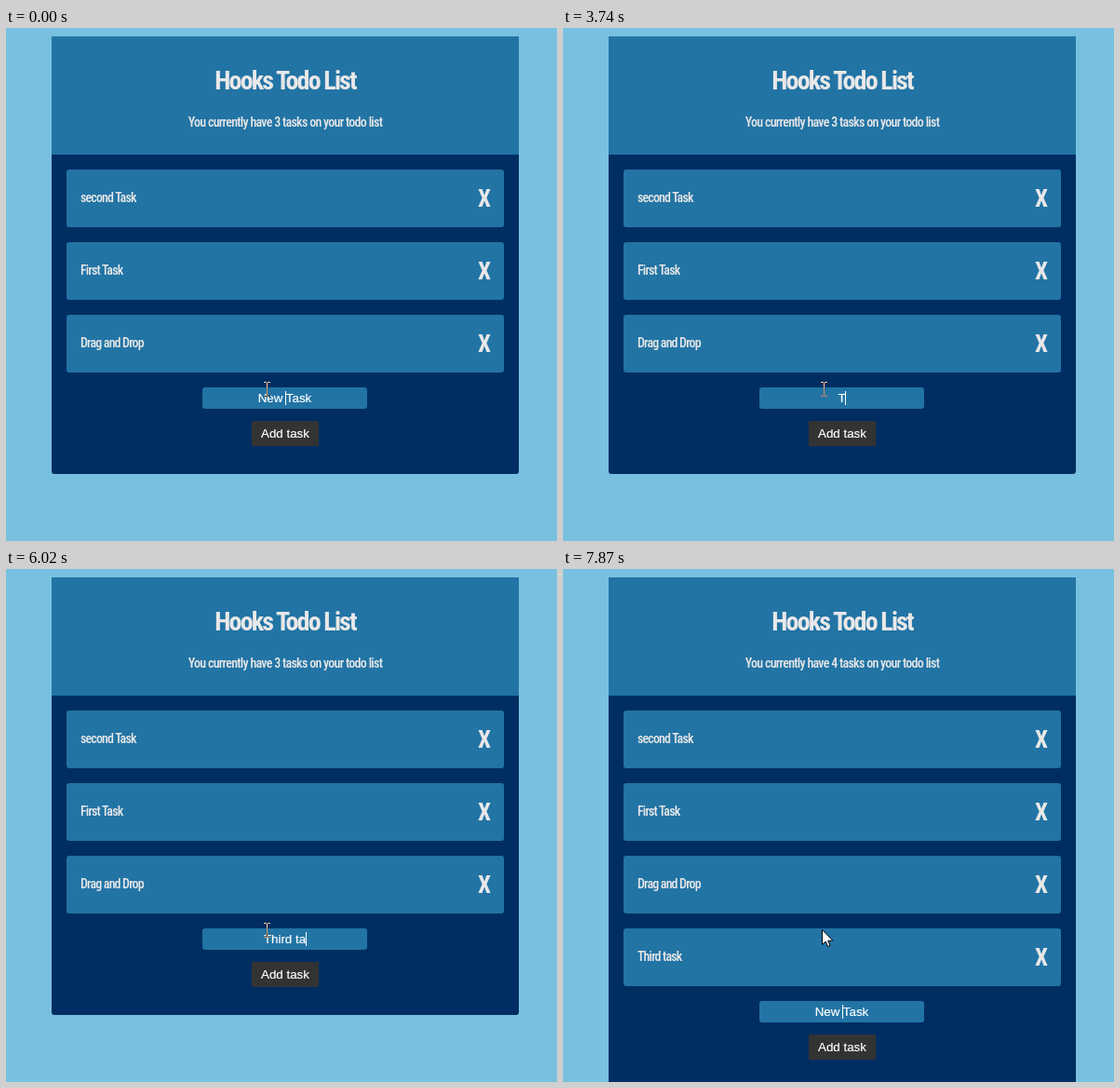
These frames come from a looping animation (592x551 px, 7990 ms). An HTML page:

```html
<!DOCTYPE html>
<html lang="en">
<head>
<meta charset="utf-8">
<title>Hooks Todo List</title>
<style>
  html, body { margin: 0; width: 100%; height: 100%; overflow: hidden; }
  body { position: relative; background: #78c0e0; color: #e9e8e8; font: 500 14px/20px "Roboto Condensed", Roboto, sans-serif; font-stretch: 75%; }
  .app { position: absolute; left: 49px; top: 9px; width: 502px; background: #002e62; border-radius: 0 0 3px 3px; text-align: center; }
  header { height: 127px; background: #2274a5; overflow: hidden; }
  h1 { margin: 25px 0 23px; font-size: 28px; line-height: 46px; height: 34px; letter-spacing: calc(.44em - 1ch); }
  p { margin: 0; letter-spacing: calc(.45em - 1ch); }
  .item { position: relative; margin: 16px 16px 0; padding: 0 15px; height: 62px; line-height: 60px; background: #2274a5; border-radius: 3px; text-align: left; letter-spacing: calc(.44em - 1ch); }
  .item b { position: absolute; right: 14px; top: 2px; font-size: 25px; font-weight: 900; letter-spacing: 0; }
  .field, .add { position: relative; font: 13.333px/23px Arial, "Liberation Sans", sans-serif; color: #fff; -webkit-text-stroke: .2px; }
  .field { margin: 16px 0 0 162px; width: 177px; height: 23px; background: #2274a5; border-radius: 3px; }
  .caret { position: absolute; top: 4px; width: 1px; height: 15px; background: #fff; }
  .add { margin: 13px auto 0; width: 72px; height: 27px; line-height: 27px; background: #333; }
  .app::after { content: ""; display: block; height: 30px; }
  svg { position: absolute; overflow: visible; }
  #beam { left: 277px; top: 380px; mix-blend-mode: difference; }
  #arrow { left: 278px; top: 387px; }
</style>
</head>
<body>
<div class="app">
  <header>
    <h1>Hooks Todo List</h1>
    <p>You currently have <span id="count">3</span> tasks on your todo list</p>
  </header>
  <div class="item">second Task<b>X</b></div>
  <div class="item">First Task<b>X</b></div>
  <div class="item">Drag and Drop<b>X</b></div>
  <div class="item" id="added">Third task<b>X</b></div>
  <div class="field"><span id="typed"></span><i class="caret" id="caret"></i></div>
  <div class="add">Add task</div>
</div>
<svg id="beam" width="7" height="16"><path d="M0 .5H3M4 .5H7M3.5 1V15M0 15.5H3M4 15.5H7" fill="none" stroke="#fff"/></svg>
<svg id="arrow" width="12" height="19"><path d="M.5 .5V16.5L4.2 13L6.6 18.5L9 17.5L6.7 12.2H11.8Z" fill="#fff" stroke="#000"/></svg>
<script>
  const LOOP = 7990, SUBMIT = 6880;
  const TASK = 'Third task';
  // [time, number of characters typed]
  const KEYS = [[0, 0], [3740, 1], [4670, 2], [4920, 4], [5180, 5], [5450, 6],
                [5580, 7], [6020, 8], [6160, 9], [6310, 10], [SUBMIT, 0]];
  // spans in which the caret is hidden
  const BLINKS = [[280, 690], [1290, 1840], [2370, 2910], [3460, 3740], [4270, 4670], [7460, 7870]];
  const el = id => document.getElementById(id);
  const show = (id, on) => { el(id).style.display = on ? '' : 'none'; };

  function draw(now) {
    const t = now % LOOP, done = t >= SUBMIT;
    const chars = KEYS.filter(([at]) => at <= t).pop()[1];
    el('count').textContent = done ? 4 : 3;
    el('typed').textContent = TASK.slice(0, chars) || 'New Task';
    // the caret stays centred while the placeholder shows
    const width = chars ? el('typed').getBoundingClientRect().width : 1;
    el('caret').style.left = Math.floor(88.75 + width / 2) + 'px';
    show('caret', !BLINKS.some(([from, to]) => t >= from && t < to));
    show('added', done);
    show('beam', !done);
    show('arrow', done);
    requestAnimationFrame(draw);
  }
  draw(performance.now());
</script>
</body>
</html>
```
